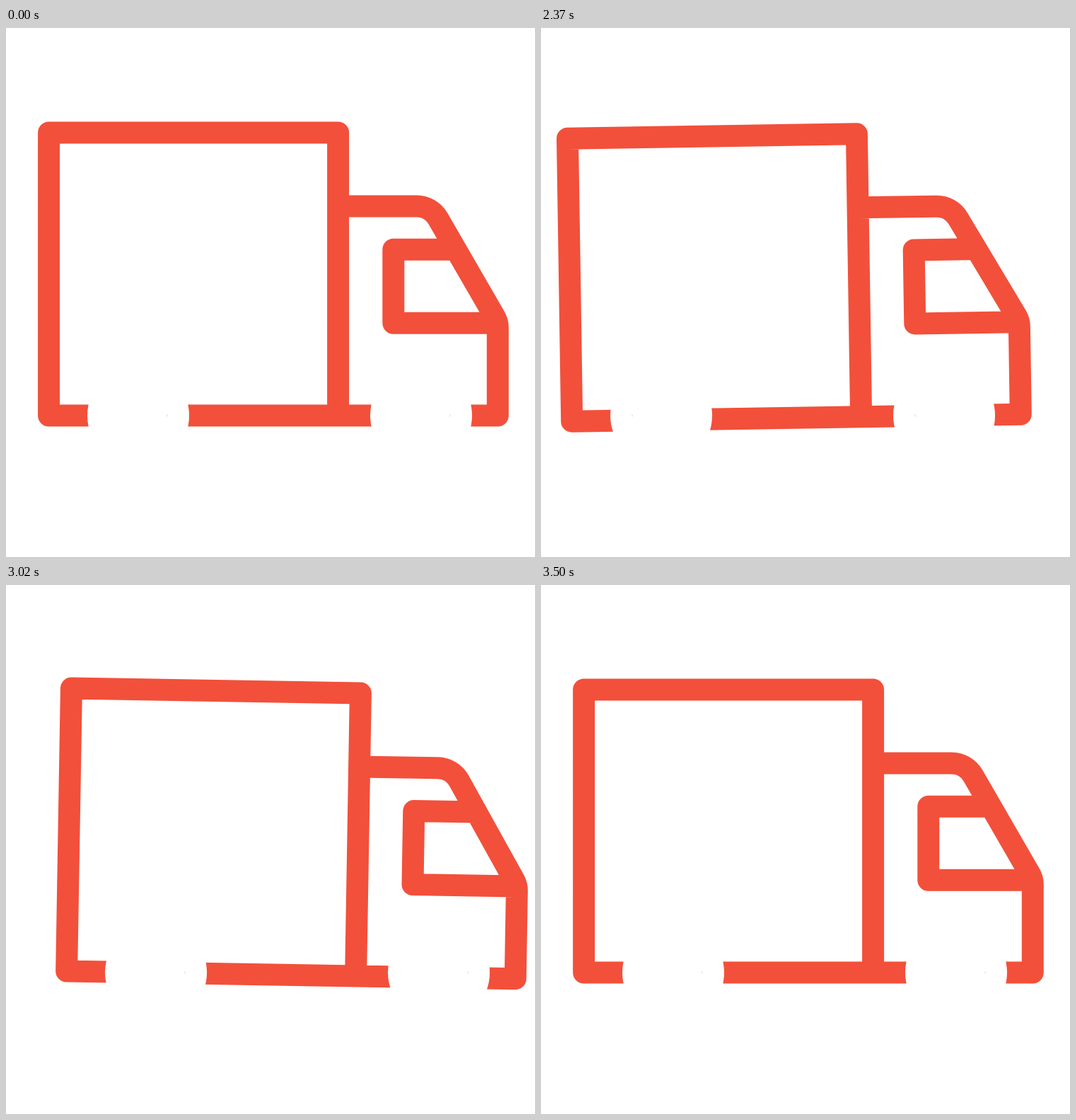
Write an HTML page with a canvas that moves like this. It is 748 px wide and 748 px high and loops after 3520 ms.

```html
<!DOCTYPE html>
<html lang="en">
<head>
<meta charset="utf-8">
<title>Truck</title>
<style>
  html, body { margin: 0; width: 100%; height: 100%; overflow: hidden; background: #fff; }
  canvas { display: block; width: 100vw; height: 100vh; }
</style>
</head>
<body>
<canvas id="stage" width="748" height="748"></canvas>
<script>
const ctx = document.getElementById('stage').getContext('2d');
const LOOP = 3520;
const RED = '#f2503b';
const GROUND = 548;
const REAR = 187, FRONT = 587;
const WHEEL_GAP = 72, HUB = 41;
const BOX = { left: 60.6, top: 148, size: 409 };
const NOSE = 695.3;

// Smooth step from 0 to 1 between two times.
function ease(t, from, to) {
  const u = Math.min(1, Math.max(0, (t - from) / (to - from)));
  return u * u * (3 - 2 * u);
}

// Rises to 1, holds until fallAt, then returns to 0.
function pulse(t, start, peak, fallAt, end) {
  return ease(t, start, peak) - ease(t, fallAt, end);
}

// The truck backs up, lurches forward and settles.
function driveOffset(t) {
  return -19 * ease(t, 2000, 2271) + 44.1 * ease(t, 2271, 3038) - 25.1 * ease(t, 3038, 3485);
}

// How far each axle sinks on its suspension.
function frontDip(t) {
  return 8.2 * pulse(t, 2000, 2150, 2150, 2360) + 9.6 * pulse(t, 2390, 2620, 2870, 3300);
}

function rearDip(t) {
  return 8.3 * pulse(t, 2200, 2455, 2455, 2780) + 9.7 * pulse(t, 3010, 3182, 3182, 3405);
}

function makeBody() {
  const path = new Path2D();
  const wall = BOX.left + BOX.size;
  path.rect(BOX.left, BOX.top, BOX.size, GROUND - BOX.top);
  // Cab
  path.moveTo(wall, 252);
  path.arcTo(600.8, 252, NOSE, 415.5, 35);
  path.arcTo(NOSE, 415.5, NOSE, GROUND, 30);
  path.lineTo(NOSE, GROUND);
  path.lineTo(wall, GROUND);
  // Window
  path.moveTo(635.6, 313.3);
  path.lineTo(547.8, 313.3);
  path.lineTo(547.8, 417.3);
  path.lineTo(691.6, 417.3);
  return path;
}

const body = makeBody();

function drawWheel(x, tilt) {
  ctx.fillStyle = '#fff';
  ctx.beginPath();
  ctx.arc(x, GROUND, WHEEL_GAP, 0, Math.PI * 2);
  ctx.fill();
  // Hairline glint on the hub
  const side = tilt < 0 ? -1 : 1;
  ctx.fillStyle = 'rgba(242, 80, 59, 0.3)';
  ctx.fillRect(x + side * HUB - 0.5, GROUND - 1.5, 1, 3);
}

function draw(t) {
  const shift = driveOffset(t);
  const rear = rearDip(t);
  const tilt = Math.atan2(frontDip(t) - rear, FRONT - REAR);

  ctx.fillStyle = '#fff';
  ctx.fillRect(0, 0, 748, 748);

  ctx.save();
  ctx.translate(REAR + shift, GROUND + rear);
  ctx.rotate(tilt);
  ctx.translate(-REAR, -GROUND);
  ctx.strokeStyle = RED;
  ctx.lineWidth = 31;
  ctx.lineJoin = 'round';
  ctx.stroke(body);
  ctx.restore();

  drawWheel(REAR + shift, tilt);
  drawWheel(FRONT + shift, tilt);
}

const start = performance.now();
function tick() {
  draw((performance.now() - start) % LOOP);
  requestAnimationFrame(tick);
}
tick();
</script>
</body>
</html>
```
